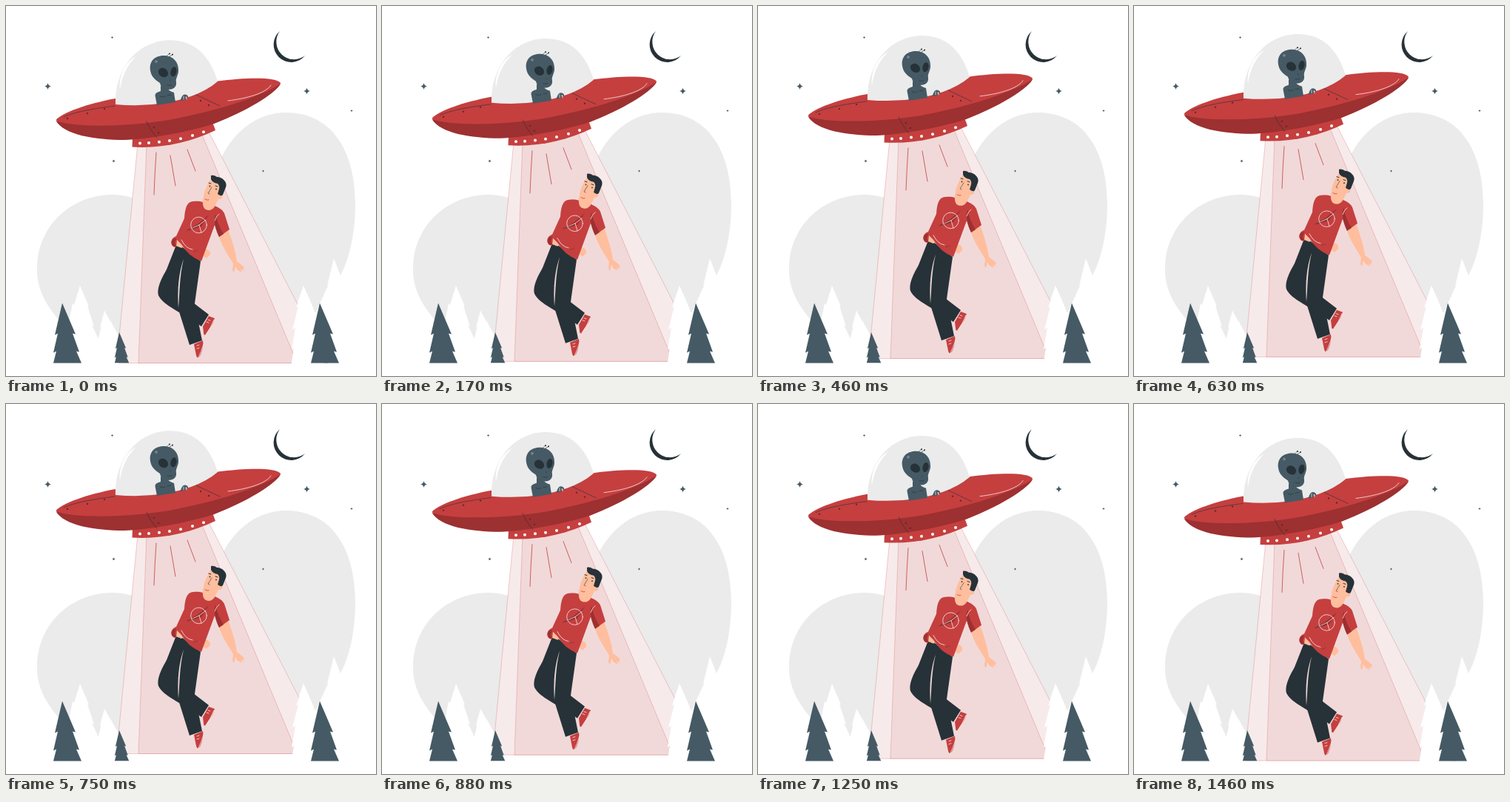
An HTML page that plays this animation: 500 by 500 pixels, repeating every 1.5 s.

```html
<!DOCTYPE html>
<html lang="en">
<head>
<meta charset="utf-8">
<title>Abduction</title>
<style>
  html, body { margin: 0; height: 100%; overflow: hidden; background: #fff; }
  svg { display: block; width: 100vw; height: 100vh; }
  .red { fill: #c53f3f; }
  .dark-red { fill: #9d3031; }
  .slate { fill: #455a64; }
  .ink { fill: #263238; }
  .skin { fill: #ffbe9d; }
  .cloud { fill: #ebebeb; }
  .white { fill: #fff; }
  .beam { fill: #f1d9d9; }
  .line { fill: none; stroke: #263238; stroke-width: .6; stroke-linecap: round; }
  .bold { stroke-width: 1; }
  .light { stroke: #fff; stroke-width: .7; }
  .ray { stroke: #c53f3f; stroke-width: .8; }
  .edge { stroke: #c53f3f; stroke-width: .25; }
</style>
</head>
<body>
<svg viewBox="0 0 500 500">
  <defs>
    <path id="tree" d="M0 0 18 42 14 41 23 66 19 65 26 81H-12L-8 65-12 67-6 41-10 43Z"/>
    <path id="star" d="M0-1Q.15-.15 1 0 .15.15 0 1-.15.15-1 0-.15-.15 0-1Z"/>
  </defs>

  <g class="cloud">
    <path d="M74 427C52 402 41 380 42 352 44 295 90 254 146 255Q165 256 180 262L175 450 152 446 141 425 140 428 133 412 127 434 129 433 125 450 116 431 119 433 110 405 112 406 100 378 92 404 90 402 84 432Z"/>
    <path d="M275 260C285 185 330 144 378 144 440 144 472 195 472 268 472 305 465 340 452 364L443 341 434 378 436 376 418 415 410 396 411 398 402 378 380 440Z"/>
  </g>
  <g id="stars" class="slate"></g>
  <path class="ink" d="M370 34A23.800 23.800 0 1 0 404 67 23.900 23.900 0 0 1 370 34Z"/>

  <g id="float">
    <g class="edge">
      <path fill="#f7eaeb" d="M178 186 149.500 482.500H435L274 170Z"/>
      <path class="beam" d="M190 186 179 482.500H393.500L265 174Z"/>
    </g>
    <path class="line ray" d="M203 198Q201 226 200 255M222 202 229 243M245 194 256 223"/>

    <g id="man">
      <path class="skin" d="M266 331C272 325 277 332 276 336L271 341 265 337Z"/>
      <path class="red" d="M266 433 274 419 282 422 279 430 270 444Q267 446 267 441Z"/>
      <path class="red" d="M254 457 266 452Q268 460 262 473 258 478 257 472Z"/>
      <path class="line light" d="M281 424Q277 435 270 444M267 457Q264 467 260 475M271 427l3 1M273 424l3 1M258 459l3-1M258 463l3-1"/>
      <path class="ink" d="M230 323 250 335 233 378Q232 384 236 388L257 404 274 417 264 433C240 415 212 405 206 391 203 379 214 362 217 356L230 323Z"/>
      <path class="ink" d="M236 324 263 345 255 402 265 452 248 458 233 410C231 390 236 365 238 345Z"/>
      <path class="beam" d="M240 342C236 354 231 372 233 408 235 385 234 368 240 342Z"/>
      <path class="skin" d="M288 312 300 302C306 318 311 335 312 345 315 348 320 350 322 354L320 355 322 358 317 356 319 360 313 357 310 352 308 360 306 357 307 348C300 336 292 325 288 312Z"/>
      <path class="skin" d="M228 316 240 318 238 327 229 324Z"/>
      <path class="red" d="M249 265C256 263 262 264 266 265L282 270Q292 274 295 280L302 302 288 312 282 296 264 345Q246 338 237 322L231 316 230 326C222 326 220 315 230 311L241 287Q242 268 249 265Z"/>
      <path class="dark-red" d="M283 281C280 290 283 302 288 312L294 308C288 299 285 290 283 281ZM230 314C225 313 222 319 226 325L230 325 228 320ZM243 304 260 294 274 282 264 298Z"/>
      <circle class="line light" cx="260.500" cy="296" r="10.800"/>
      <path class="line light" d="M250 301 261 296 270 289M261 296 264 306M282 290Q284 284 288 281M237 316Q243 328 252 329"/>
      <path class="line" d="M254 332 259 330M245 303 260 298" opacity=".6"/>
      <path class="skin" d="M277 234C271 243 267 252 267 258 265 262 266 264 266 267 266 277 277 279 282 271L287 261C292 262 294 257 291 253L288 237Z"/>
      <path class="ink" d="M277 229Q281 228 285 231C292 231 300 238 297 245L293 255C291 258 288 255 286 254L288 247Q289 243 286 240 279 239 277 234Z"/>
      <path class="line bold" d="M274 239l3 1M283 243l3 1"/>
      <path class="line" d="M278 245Q275 250 273 253l2 1"/>
      <path class="line ray" d="M269 261q3 2 5 1"/>
      <circle class="ink" cx="275.500" cy="243.500" r=".9"/>
      <circle class="ink" cx="284" cy="247.500" r=".9"/>
    </g>

    <g id="ship">
      <path class="red" d="M171 178 170.500 190.500C210 193 250 184 283 168L279 157Z"/>
      <g id="lamps" class="white"></g>
      <path class="red" d="M67.500 154C76 144 110 132 148 125L286 101.500C320 97 365 95 371 104 371 113 330 138 281 159 210 175 90 180 67.500 154Z"/>
      <path class="dark-red" d="M67.500 155C90 164 160 164 220 154 290 141 345 122 371 105 362 120 325 142 281 159 240 172 190 180 160 181 120 181 78 174 67.500 155Z"/>
      <path class="line" d="M78 150C90 144 115 139 147 135M257 120 289 135M190 156Q195 168 204 178"/>
      <path class="line light" d="M300 128C325 125 351 118 358 107"/>
      <g id="rivets" fill="#722426"></g>
      <path class="cloud" d="M148 133C146 88 175 50 215 46.500 252 43.500 275 65 286 102Q272 114 250 122 205 138 148 133Z"/>
      <path class="white" d="M154 113C152 93 162 75 176 68 164 80 157 93 154 113Z"/>
    </g>

    <g id="alien">
      <path class="slate" d="M209 108V115Q201 117 201.500 121L204 134 229 130 227 117Q218 114 218 110Z"/>
      <path class="slate" d="M195 87C193 73 203 67 213 67 226 67 234 76 233 89 232 95 229 98 230 103 231 110 225 113 219 113 211 113 209 108 208 104 200 99 196 94 195 87Z"/>
      <path class="line" d="M217 68l4-4M221 68l4-2M208 122q3 2 7 0M218 121l5-1M218 107q3 1 6 0M222 100v1"/>
      <circle class="ink" cx="221" cy="64.500" r="1"/>
      <circle class="ink" cx="225" cy="65.500" r="1"/>
      <ellipse class="ink" cx="212.500" cy="90" rx="7" ry="5.700" transform="rotate(35 212.500 90)"/>
      <ellipse class="ink" cx="226.500" cy="88.800" rx="4" ry="6.600" transform="rotate(12 226.500 88.800)"/>
      <circle cx="203" cy="75" r="2" fill="#71828a"/>
      <path class="slate" d="M236 128C237 120 242 117 246 122L246 125 243 122 242 127Z"/>
      <path class="line light" d="M240 126v-4M244 126v-2"/>
    </g>
  </g>

  <path class="white" d="M133 412 152 445V484H118L125 450ZM402 378 392 408 395 406 387 437 391 435 386 464 389 462 385.500 484H430L418 415Z"/>
  <g class="slate">
    <use href="#tree" x="76" y="401.500"/>
    <use href="#tree" x="424" y="401.500"/>
    <use href="#tree" transform="translate(153 441) scale(.51)"/>
  </g>
</svg>
<script>
  const fill = (id, items, draw) => {
    document.getElementById(id).innerHTML = items.map(draw).join('');
  };
  const dot = r => ([x, y]) => `<circle cx="${x}" cy="${y}" r="${r}"/>`;

  fill('stars', [[56.5, 108.5, 4.5], [406.5, 115, 4.5], [143.5, 42.5, 1.8], [467, 141.5, 1.8], [145.5, 209.5, 2], [347.5, 223, 1.8]],
    ([x, y, r]) => `<use href="#star" transform="translate(${x} ${y}) scale(${r})"/>`);
  fill('lamps', [[181, 185.5], [193, 185], [207, 183.7], [221, 182], [236, 179.3], [252, 175], [267, 170.3]], dot(2));
  fill('rivets', [[83, 152], [110, 145], [133, 139], [263, 128], [274, 134], [200, 164], [206, 171]], dot(1.2));

  const LOOP = 1500, STEPS = 36, LIFT = 10;
  const floating = document.getElementById('float');
  const start = performance.now();

  function render() {
    const elapsed = (performance.now() - start) % LOOP;
    const phase = Math.round(elapsed / LOOP * STEPS) / STEPS;
    const rise = LIFT * (1 - Math.abs(1 - 2 * phase));
    floating.setAttribute('transform', `translate(0 ${-rise})`);
    requestAnimationFrame(render);
  }
  render();
</script>
</body>
</html>
```
